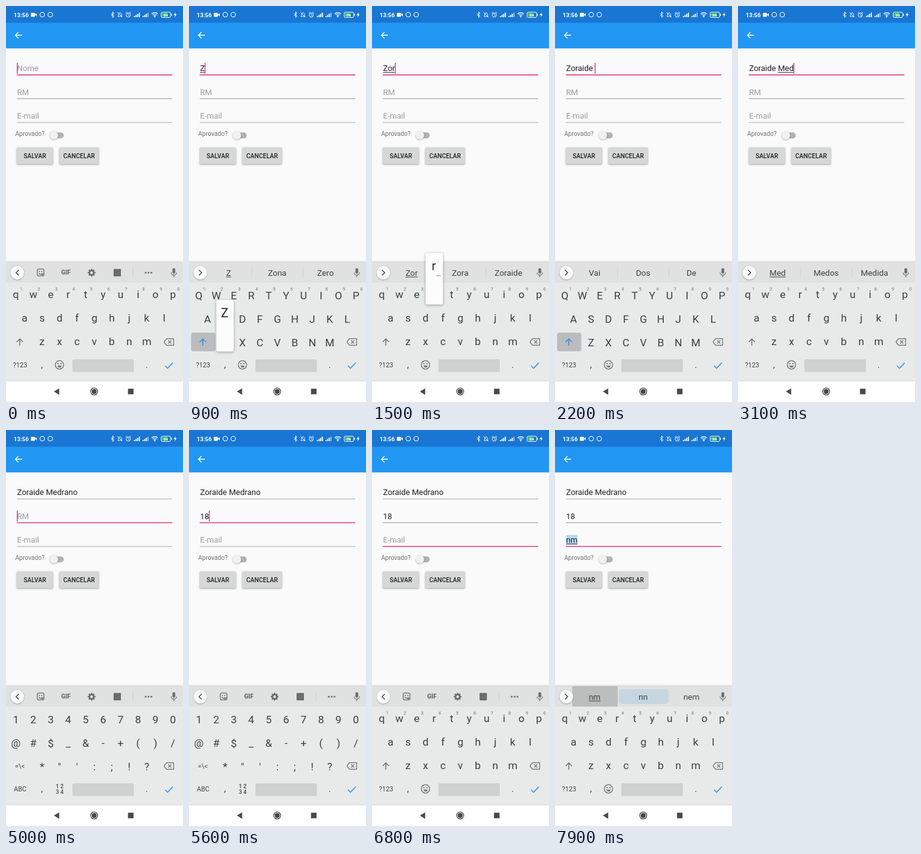
An HTML page with a canvas that plays this animation: 288 by 640 pixels, repeating every 8000 ms.

```html
<!DOCTYPE html>
<html lang="pt-BR">
<head>
<meta charset="utf-8">
<title>Cadastro</title>
<style>
html, body { margin: 0; width: 100%; height: 100%; overflow: hidden; background: #fafafa; }
canvas { display: block; width: 288px; height: 640px; }
</style>
</head>
<body>
<canvas id="stage"></canvas>
<script>
const W = 288, H = 640, LOOP = 8000, PRESS = 160;
const PINK = '#e0438a', INK = '#3c4043', GREY = '#6b6e70';
const canvas = document.getElementById('stage');
const c = canvas.getContext('2d');
const dpr = window.devicePixelRatio || 1;
canvas.width = W * dpr;
canvas.height = H * dpr;

// Each step changes part of the screen state at its time.
const steps = [
  [0, { texts: ['', '', ''], focus: 0, board: 'lower', words: null, composing: false, down: -1, pick: -1, selected: false }],
  [600, { board: 'upper' }],
  [900, { key: 'Z', texts: ['Z', '', ''], words: ['Z', 'Zona', 'Zero'], composing: true }],
  [1060, { board: 'lower' }],
  [1200, { key: 'o', texts: ['Zo', '', ''], words: ['Zo', 'Zoo', 'Zona'] }],
  [1400, { key: 'r', texts: ['Zor', '', ''], words: ['Zor', 'Zora', 'Zoraide'] }],
  [2050, { down: 2 }],
  [2200, { texts: ['Zoraide ', '', ''], words: ['Vai', 'Dos', 'De'], board: 'upper', composing: false, down: -1 }],
  [2450, { key: 'M', texts: ['Zoraide M', '', ''], words: ['M', 'Me', 'Mas'], composing: true }],
  [2610, { board: 'lower' }],
  [2700, { key: 'e', texts: ['Zoraide Me', '', ''], words: ['Me', 'Meu', 'Mesmo'] }],
  [2900, { key: 'd', texts: ['Zoraide Med', '', ''], words: ['Med', 'Medos', 'Medida'] }],
  [3200, { key: 'r', texts: ['Zoraide Medr', '', ''], words: ['Medr', 'Medrar', 'Medrou'] }],
  [3400, { key: 'a', texts: ['Zoraide Medra', '', ''], words: ['Medra', 'Medrar', 'Medram'] }],
  [3600, { key: 'n', texts: ['Zoraide Medran', '', ''], words: ['Medran', 'Medrano', 'Medram'] }],
  [3800, { key: 'o', texts: ['Zoraide Medrano', '', ''], words: ['Medrano', 'Medrado', ''] }],
  [5000, { focus: 1, board: 'symbols', words: null, composing: false }],
  [5250, { key: '1', texts: ['Zoraide Medrano', '1', ''] }],
  [5430, { key: '8', texts: ['Zoraide Medrano', '18', ''] }],
  [6100, { focus: 2, board: 'lower' }],
  [6900, { key: 'n', texts: ['Zoraide Medrano', '18', 'n'], words: ['n', 'não', 'na'], composing: true }],
  [7200, { key: 'm', texts: ['Zoraide Medrano', '18', 'nm'], words: ['nm', 'nn', 'nem'], pick: 1 }],
  [7700, { down: 0, selected: true }]
];

const rows = {
  lower: ['qwertyuiop', 'asdfghjkl', 'zxcvbnm'],
  upper: ['QWERTYUIOP', 'ASDFGHJKL', 'ZXCVBNM'],
  symbols: ['1234567890', '@#$_&-+()/', '*"\':;!?']
};

function stateAt(t) {
  const s = { keyTime: -1e4, moved: 0 };
  for (const [at, patch] of steps) {
    if (at > t) break;
    Object.assign(s, patch);
    if (patch.key) s.keyTime = at;
    if (patch.texts || 'focus' in patch) s.moved = at;
  }
  return s;
}

function rect(x, y, w, h, color, r = 0) {
  c.fillStyle = color;
  c.beginPath();
  c.roundRect(x, y, w, h, r);
  c.fill();
}

function disc(x, y, r, color) {
  c.fillStyle = color;
  c.beginPath();
  c.arc(x, y, r, 0, 7);
  c.fill();
}

function ring(x, y, r, color, lw = 1) {
  c.strokeStyle = color;
  c.lineWidth = lw;
  c.beginPath();
  c.arc(x, y, r, 0, 7);
  c.stroke();
}

// Strokes one or more polylines given as flat point lists.
function lines(color, lw, ...paths) {
  c.strokeStyle = color;
  c.lineWidth = lw;
  c.beginPath();
  for (const p of paths)
    for (let i = 0; i < p.length; i += 2) c[i ? 'lineTo' : 'moveTo'](p[i], p[i + 1]);
  c.stroke();
}

function poly(color, ...p) {
  c.fillStyle = color;
  c.beginPath();
  for (let i = 0; i < p.length; i += 2) c.lineTo(p[i], p[i + 1]);
  c.fill();
}

function text(str, x, y, size, color, align = 'left', weight = 400) {
  c.font = `${weight} ${size}px Roboto, sans-serif`;
  c.fillStyle = color;
  c.textAlign = align;
  c.fillText(str, x, y);
  return c.measureText(str).width;
}

function shadow(draw, blur = 3, dy = 1) {
  c.save();
  c.shadowColor = 'rgba(0,0,0,.35)';
  c.shadowBlur = blur * dpr;
  c.shadowOffsetY = dy * dpr;
  draw();
  c.restore();
}

function statusBar() {
  const w = '#fff';
  rect(0, 0, W, 27, '#1976d2');
  text('13:56', 12.5, 17.5, 9.5, w, 'left', 700);
  rect(40.5, 11, 6.5, 6.5, w, 1);
  poly(w, 47, 14, 50, 11.5, 50, 17);
  ring(59, 14, 3.7, w, 1.1);
  ring(72, 14, 3.7, w, 1.1);
  lines(w, .9, [171, 12, 176, 16.3, 173.5, 18.5, 173.5, 9.5, 176, 11.7, 171, 16]);
  lines(w, .9, [182, 17, 183, 15.5, 183, 12.5, 185.5, 10.5, 188, 12.5, 188, 15.5, 189, 17, 182, 17], [181.5, 10, 189.5, 18.5]);
  ring(199, 14.5, 3.4, w);
  lines(w, .9, [199, 12.5, 199, 14.8, 200.8, 15.5], [194.7, 11.5, 197, 9.5], [203.3, 11.5, 201, 9.5]);
  for (const x of [208, 222])
    for (let i = 0; i < 4; i++)
      rect(x + i * 2.7, 16.2 - i * 1.8, 1.8, 1.8 + i * 1.8, i < 3 || x < 210 ? w : 'rgba(255,255,255,.55)');
  c.lineWidth = 1.2;
  c.strokeStyle = w;
  for (const r of [2.5, 5, 7.3]) {
    c.beginPath();
    c.arc(242, 18, r, -2.35, -.79);
    c.stroke();
  }
  disc(242, 17.6, 1, w);
  c.strokeStyle = w;
  c.lineWidth = 1;
  c.beginPath();
  c.roundRect(252.5, 10, 15.5, 8.5, 2);
  c.stroke();
  rect(254, 11.5, 9, 5.5, '#58d05c', 1);
  rect(268.5, 12.5, 1.3, 3.5, w);
  text('54', 260, 16.7, 6, w, 'center', 700);
  poly(w, 276, 10, 272.7, 14.8, 275, 14.8, 274.2, 18.5, 277.6, 13.3, 275.3, 13.3);
}

function button(label, x, w) {
  shadow(() => rect(x, 228.5, w, 27, '#d6d7d7', 1.5), 2.5, 1);
  text(label, x + w / 2, 245.7, 10.1, '#222', 'center', 500);
}

function form(s, t) {
  const hints = ['Nome', 'RM', 'E-mail'];
  hints.forEach((hint, i) => {
    const base = 105.3 + i * 38.4, focused = s.focus === i;
    const value = s.texts[i];
    c.font = '400 13px Roboto, sans-serif';
    const width = c.measureText(value).width;
    if (focused && s.selected) rect(18, base - 12.5, width, 16, '#b5d9f1');
    text(value || hint, 18, base, 13, value ? '#202020' : '#9c9c9c');
    if (focused && s.composing) {
      const from = c.measureText(value.slice(0, value.lastIndexOf(' ') + 1)).width;
      rect(18 + from, base + 1.5, width - from, 1, '#333');
    }
    const y = 111.3 + i * 38.4;
    rect(17.5, y - (focused ? .7 : .4), 253, focused ? 1.6 : .9, focused ? PINK : '#929292');
    if (focused && !s.selected && (t - s.moved) % 1000 < 500)
      rect(18 + width - .4, base - 13.5, 1.5, 17.5, PINK);
  });
  text('Aprovado?', 15, 210.3, 10.1, '#737373');
  rect(74, 204.2, 20, 9.8, '#b2b2b2', 4.9);
  shadow(() => disc(78, 209, 6.8, '#f1f1f1'), 2.5, .8);
  button('SALVAR', 17.5, 59);
  button('CANCELAR', 86.7, 64.5);
}

function toolbar() {
  c.strokeStyle = GREY;
  c.lineWidth = 1.3;
  c.beginPath();
  c.roundRect(51, 425.2, 10.7, 11, 2);
  c.stroke();
  disc(54.3, 429, .9, GREY);
  disc(58.3, 429, .9, GREY);
  c.beginPath();
  c.arc(56.3, 431, 2.6, .2, 2.94);
  c.stroke();
  poly(GREY, 58, 436.5, 62, 432.5, 58, 432.5);
  text('GIF', 97.3, 434.4, 10, GREY, 'center', 900);
  for (let i = 0; i < 8; i++) {
    const a = i * Math.PI / 4, x = Math.cos(a), y = Math.sin(a);
    lines(GREY, 2.4, [139.3 + x * 3, 431 + y * 3, 139.3 + x * 6.2, 431 + y * 6.2]);
  }
  ring(139.3, 431, 3.5, GREY, 2.6);
  rect(175, 425, 12, 12, GREY, 1);
  rect(206, 422, .8, 18, '#cfcfcf');
  for (const x of [227.3, 232, 236.7]) disc(x, 431, 1.5, GREY);
}

function suggestions(s) {
  const centers = [64.5, 143.5, 222];
  for (const x of [101.5, 185]) rect(x, 422, .8, 18, '#cfcfcf');
  if (s.down >= 0) rect([28, 102, 186][s.down], 414, s.down === 1 ? 84 : 74, 33, '#bcbdbd');
  if (s.pick >= 0) rect(104, 419, 80, 24, '#c5d6e1', 5);
  s.words.forEach((word, i) => {
    const w = text(word, centers[i], 436, 13.4, INK, 'center');
    if (i === 0 && s.composing) rect(centers[0] - w / 2, 437.5, w, 1, INK);
  });
}

function mic() {
  rect(270.8, 423.7, 4.6, 8.8, GREY, 2.3);
  c.strokeStyle = GREY;
  c.lineWidth = 1.2;
  c.beginPath();
  c.arc(273.1, 430.8, 4.4, 0, Math.PI);
  c.stroke();
  lines(GREY, 1.3, [273.1, 435, 273.1, 438.2]);
}

function keyPlace(board, key) {
  for (let row = 0; row < 3; row++) {
    const i = rows[board][row].indexOf(key);
    if (i >= 0) return { x: keyX(board, row, i), row };
  }
}

function keyX(board, row, i) {
  const indent = row === 2 ? 42.6 : row === 1 && board !== 'symbols' ? 14.2 : 0;
  return 16 + indent + i * 28.4;
}

function keys(s) {
  const { board } = s, symbols = board === 'symbols', upper = board === 'upper';
  rows[board].forEach((row, r) => {
    const base = 472.3 + r * 38 + (board === 'lower' ? 0 : 1.5);
    [...row].forEach((ch, i) => {
      const x = keyX(board, r, i);
      text(ch, x, base, 17.3, INK, 'center');
      if (r === 0 && !symbols) text(String((i + 1) % 10), x + 9, 460.3, 6.8, GREY, 'center');
    });
  });
  if (symbols) {
    text('=\\<', 22.5, 547, 10.8, INK, 'center');
  } else {
    if (upper) rect(3.3, 528, 39.5, 30, '#bbbcbd', 3.5);
    lines(upper ? '#2b8ae2' : GREY, 1.4, [22.5, 549, 22.5, 538], [17.5, 543, 22.5, 538, 27.5, 543]);
  }
  lines(GREY, 1.2, [257, 543, 261.3, 537.7, 272.7, 537.7, 272.7, 548.3, 261.3, 548.3, 257, 543],
    [263.7, 540.3, 269, 545.7], [269, 540.3, 263.7, 545.7]);
  text(symbols ? 'ABC' : '?123', 23, 584.2, 10.6, INK, 'center');
  text(',', 58.5, 584.5, 15, INK, 'center');
  if (symbols) {
    text('1 2', 87.3, 579, 9, INK, 'center', 500);
    text('3 4', 87.3, 588, 9, INK, 'center', 500);
  } else {
    ring(87, 580, 6.8, GREY, 1.3);
    disc(84.6, 578.2, 1.1, GREY);
    disc(89.4, 578.2, 1.1, GREY);
    c.beginPath();
    c.arc(87, 580.8, 3.4, .1, 3.04);
    c.fill();
  }
  rect(108, 571, 100, 20.5, '#cfd0d0', 2);
  text('.', 229, 585, 15, INK, 'center');
  lines('#3f97e4', 1.6, [258.7, 581.3, 262.8, 585.5, 271.3, 576.6]);
}

function popup(s, t) {
  if (t - s.keyTime >= PRESS) return;
  const { x, row } = keyPlace(s.board, s.key), y = 399 + row * 38;
  shadow(() => rect(x - 14.2, y, 28.4, 83.5, '#fcfcfc', 3), 4, 1);
  text(s.key, x - .6, y + 28, 20, '#222', 'center');
  if (row === 0 && s.board !== 'symbols')
    for (let i = 0; i < 3; i++) disc(x + 4.8 + i * 2.4, y + 37, .7, '#444');
}

function keyboard(s, t) {
  shadow(() => rect(0, 414, W, 191, '#e8e9e9'), 3, 0);
  rect(0, 414, W, 33, '#e0e1e1');
  if (s.words) suggestions(s);
  else toolbar();
  shadow(() => disc(18.5, 431, 11, '#f8f8f8'), 2, .6);
  const d = s.words ? 2.2 : -2.2;
  lines('#444', 1.4, [18.5 - d, 426.7, 18.5 + d, 431, 18.5 - d, 435.3]);
  mic();
  keys(s);
  popup(s, t);
}

function navBar() {
  rect(0, 605, W, 35, '#fff');
  poly('#484848', 78, 623, 86.5, 618, 86.5, 628.5);
  ring(143.5, 623, 5.7, '#484848', 1.2);
  disc(143.5, 623, 4, '#484848');
  rect(198.5, 618.5, 9, 9, '#484848');
}

function draw(t) {
  const s = stateAt(t);
  c.setTransform(dpr, 0, 0, dpr, 0, 0);
  rect(0, 0, W, H, '#fafafa');
  rect(0, 26, W, 42.5, '#2196f3');
  statusBar();
  lines('#fff', 1.4, [26, 47.3, 15.5, 47.3], [20.3, 42.3, 15.3, 47.3, 20.3, 52.3]);
  form(s, t);
  navBar();
  keyboard(s, t);
}

const start = performance.now();
function tick() {
  draw((performance.now() - start) % LOOP);
  requestAnimationFrame(tick);
}
tick();
</script>
</body>
</html>
```
